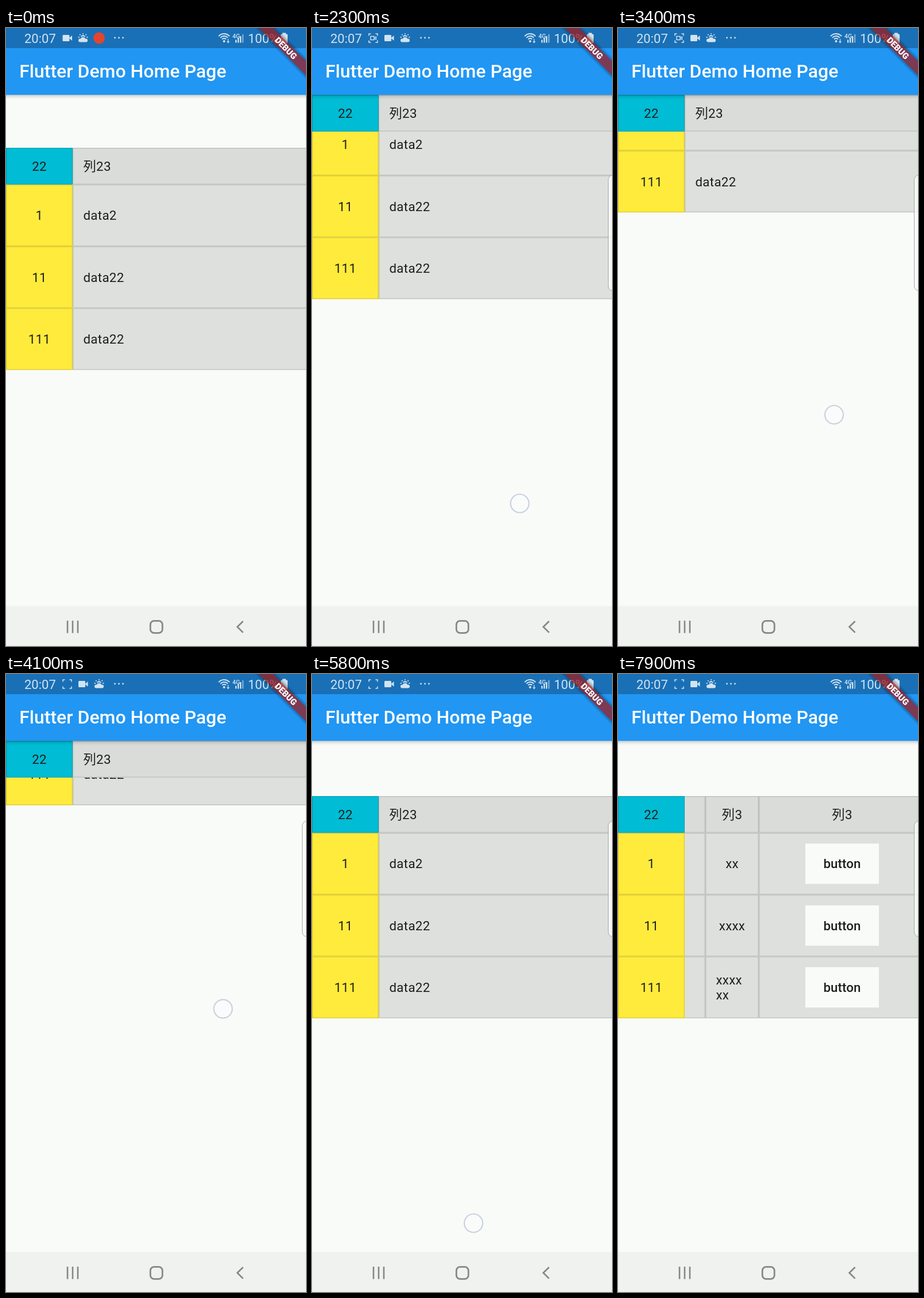
Animation, 522 px wide and 1073 px high, one loop 8000 ms. Source, as an HTML page with a canvas:

```html
<!DOCTYPE html>
<html lang="en">
<head>
<meta charset="utf-8">
<title>Table scroll</title>
<style>
html, body { margin: 0; width: 100%; height: 100%; overflow: hidden; background: #f9fbf8; }
canvas { display: block; }
</style>
</head>
<body>
<canvas id="stage" width="522" height="1073"></canvas>
<script>
const ctx = document.getElementById('stage').getContext('2d');
const W = 522, H = 1073, LOOP = 8000, STEP = 100;
const FONT = 'Roboto, "Noto Sans CJK JP", "Noto Sans CJK SC", "Noto Sans CJK", sans-serif';
const PAPER = '#f9fbf8', INK = '#1d1e1d', STATUS_INK = '#d3e3f0';
const BAR_BOTTOM = 116, HEAD_H = 63.8, ROW_H = 107.3, FIXED_W = 116;

// time, finger x, finger y, table top
const VERTICAL = [
  [1200, 357, 946, 208], [1500, 358, 888, 148], [2000, 359, 851, 110],
  [2300, 361.5, 825.5, 85], [2900, 369, 744, 8], [3400, 376, 671.5, -65.5],
  [3800, 379, 617, -121], [4200, 376, 577, -163], [4700, 360, 612, -136],
  [5000, 346.5, 657.5, -92], [5300, 321, 795, 40], [5600, 290, 928, 182],
  [5800, 281, 953.5, 212], [6100, 279, 953, 212]
];
// time, finger x, finger y, horizontal offset
const HORIZONTAL = [
  [6300, 440, 432, 0], [6600, 405, 431, 22], [7000, 190, 428, 250],
  [7200, 95, 427, 347], [7300, 63, 427, 374], [7500, 63, 427, 392],
  [7900, 63, 427, 399]
];

const COLUMNS = [
  { width: 435, head: '列23', cells: ['data2', 'data22', 'data22'], left: true },
  { width: 93, head: '列3', cells: ['xx', 'xxxx', 'xxxx\nxx'] },
  { width: 290, head: '列3', cells: ['button', 'button', 'button'], button: true }
];
const FIXED = { width: FIXED_W, head: '22', cells: ['1', '11', '111'], fixed: true };

function sample(keys, t, field) {
  const last = keys.length - 1;
  if (t <= keys[0][0]) return keys[0][field];
  if (t >= keys[last][0]) return keys[last][field];
  const i = keys.findIndex(k => k[0] > t) - 1;
  const slope = j => {
    const a = keys[Math.max(0, j - 1)], b = keys[Math.min(last, j + 1)];
    return (b[field] - a[field]) / (b[0] - a[0]);
  };
  const a = keys[i], b = keys[i + 1], d = b[0] - a[0], u = (t - a[0]) / d;
  const u2 = u * u, u3 = u2 * u;
  return (2 * u3 - 3 * u2 + 1) * a[field] + (u3 - 2 * u2 + u) * d * slope(i)
    + (3 * u2 - 2 * u3) * b[field] + (u3 - u2) * d * slope(i + 1);
}

function rect(x, y, w, h, color) {
  ctx.fillStyle = color;
  ctx.fillRect(x, y, w, h);
}

function disc(x, y, r, color) {
  ctx.fillStyle = color;
  ctx.beginPath();
  ctx.arc(x, y, r, 0, Math.PI * 2);
  ctx.fill();
}

function line(points, color, width) {
  ctx.strokeStyle = color;
  ctx.lineWidth = width;
  ctx.beginPath();
  points.forEach(([x, y]) => ctx.lineTo(x, y));
  ctx.stroke();
}

function text(str, x, y, { size = 22.3, weight = 400, color = INK, align = 'left', spacing = 0.3 } = {}) {
  ctx.font = `${weight} ${size}px ${FONT}`;
  ctx.letterSpacing = spacing + 'px';
  ctx.textAlign = align;
  ctx.fillStyle = color;
  ctx.fillText(str, x, y);
}

function clipped(x, y, w, h, draw) {
  ctx.save();
  ctx.beginPath();
  ctx.rect(x, y, w, h);
  ctx.clip();
  draw();
  ctx.restore();
}

function cell(x, y, w, h, color) {
  rect(x, y, w, h, color);
  ctx.strokeStyle = 'rgba(0,0,0,0.13)';
  ctx.lineWidth = 1.45;
  ctx.strokeRect(x + 0.72, y + 0.72, w - 1.45, h - 1.45);
}

function label(col, str, x, mid) {
  if (col.left) return text(str, x + 18.5, mid + 8);
  const lines = str.split('\n');
  if (lines.length > 1) {
    lines.forEach((s, i) => text(s, x + 18.5, mid - 5 + i * 26));
  } else {
    text(str, x + col.width / 2, mid + 8, { align: 'center' });
  }
}

function drawRows(col, x, top) {
  col.cells.forEach((str, i) => {
    const y = top + HEAD_H + i * ROW_H, mid = y + ROW_H / 2;
    cell(x, y, col.width, ROW_H, col.fixed ? '#ffeb3b' : '#dee0dd');
    if (col.button) {
      const cx = x + col.width / 2;
      rect(cx - 64, mid - 35, 128, 70, PAPER);
      text(str, cx, mid + 8, { weight: 500, align: 'center', spacing: 0.1 });
    } else {
      label(col, str, x, mid);
    }
  });
}

function drawHead(col, x, y) {
  cell(x, y, col.width, HEAD_H, col.fixed ? '#00bcd4' : '#dadcd9');
  label(col, col.head, x, y + HEAD_H / 2);
}

function drawTable(top, shift) {
  const headY = Math.max(BAR_BOTTOM, top), bodyY = headY + HEAD_H;
  const eachColumn = draw => {
    clipped(FIXED_W, 0, W - FIXED_W, H, () => {
      let x = FIXED_W - shift;
      for (const col of COLUMNS) {
        draw(col, x);
        x += col.width;
      }
    });
    draw(FIXED, 0);
  };
  clipped(0, bodyY, W, H, () => eachColumn((col, x) => drawRows(col, x, top)));
  eachColumn((col, x) => drawHead(col, x, headY));
}

function drawAppBar() {
  const shade = ctx.createLinearGradient(0, BAR_BOTTOM, 0, BAR_BOTTOM + 8);
  shade.addColorStop(0, 'rgba(0,0,0,0.22)');
  shade.addColorStop(0.4, 'rgba(0,0,0,0.08)');
  shade.addColorStop(1, 'rgba(0,0,0,0)');
  rect(0, BAR_BOTTOM, W, 8, shade);
  rect(0, 0, W, BAR_BOTTOM, '#2196f3');
  rect(0, 0, W, 35, '#1a70b6');
  text('Flutter Demo Home Page', 23.2, 86, { size: 31.9, weight: 500, color: '#fff', spacing: 0.05 });
}

function cameraIcon(x) {
  ctx.fillStyle = STATUS_INK;
  ctx.beginPath();
  ctx.roundRect(x - 8.5, 12, 12, 11, 1.5);
  ctx.moveTo(x + 3, 17.5);
  ctx.lineTo(x + 8, 13);
  ctx.lineTo(x + 8, 22);
  ctx.fill();
}

function weatherIcon(x) {
  for (let i = 0; i < 5; i++) {
    const a = Math.PI * (1 + i / 4), c = Math.cos(a), s = Math.sin(a);
    line([[x + 6 * c, 16 + 5 * s], [x + 8.5 * c, 16 + 7 * s]], STATUS_INK, 1.6);
  }
  disc(x, 16, 3.8, STATUS_INK);
  disc(x, 19.5, 5, '#1a70b6');
  disc(x, 20, 4, STATUS_INK);
  ctx.beginPath();
  ctx.roundRect(x - 8, 18.5, 16, 6, 3);
  ctx.fill();
}

function recorderIcon(x, lit) {
  for (const sx of [-1, 1]) for (const sy of [-1, 1]) {
    line([[x + sx * 4, 17.5 + sy * 7.5], [x + sx * 7.5, 17.5 + sy * 7.5], [x + sx * 7.5, 17.5 + sy * 4]], STATUS_INK, 1.5);
  }
  if (!lit) return;
  ctx.lineWidth = 1.4;
  ctx.strokeRect(x - 4.5, 14.5, 6, 6);
  line([[x + 2, 17], [x + 5, 15], [x + 5, 20], [x + 2, 18]], STATUS_INK, 1.2);
}

function drawStatus(t) {
  text('20:07', 32, 26, { size: 22, color: STATUS_INK, spacing: 0 });
  if (t < 100) {
    cameraIcon(107);
    weatherIcon(134);
    disc(162, 17.5, 10, '#e2452f');
  } else {
    recorderIcon(106.5, (t + 800) % 1000 < 500);
    cameraIcon(134.5);
    weatherIcon(162);
  }
  for (let i = 0; i < 3; i++) disc(189.5 + i * 7, 17, 1.4, STATUS_INK);

  ctx.strokeStyle = STATUS_INK;
  ctx.lineWidth = 2;
  for (const r of [4.5, 8.5, 12.5]) {
    ctx.beginPath();
    ctx.arc(379.5, 22.5, r, Math.PI * 1.23, Math.PI * 1.77);
    ctx.stroke();
  }
  disc(379.5, 23, 2, STATUS_INK);
  line([[386.5, 19], [386.5, 25]], STATUS_INK, 1.3);
  line([[384.5, 23], [386.5, 25.5], [388.5, 23]], STATUS_INK, 1.2);
  text('4G', 394, 17.5, { size: 10.5, weight: 500, color: STATUS_INK, spacing: 0 });
  for (let i = 0; i < 4; i++) {
    const h = 5 + i * 3.2;
    rect(399 + i * 4, 25.5 - h, 2.3, h, i < 3 ? STATUS_INK : '#7fadd2');
  }
  text('100%', 421, 26, { size: 22, color: STATUS_INK, spacing: 0 });
  rect(481, 8.5, 6, 3, STATUS_INK);
  ctx.beginPath();
  ctx.roundRect(478, 10.5, 12, 16.5, 1.5);
  ctx.fill();
}

function drawBanner() {
  ctx.save();
  ctx.translate(W, 0);
  ctx.rotate(Math.PI / 4);
  // Shadow only outside the strip, so the translucent red stays clean.
  for (let i = 1; i <= 5; i++) rect(-70, 40.6 - i, 140, 17.4 + 2 * i, 'rgba(0,0,0,0.055)');
  rect(-58, 40.6, 116, 17.4, 'rgba(183,28,28,0.63)');
  text('DEBUG', 0, 54.6, { size: 14.8, weight: 900, color: '#fff', align: 'center', spacing: 0 });
  ctx.restore();
}

function drawNav() {
  const gray = '#858785';
  rect(0, 1003.5, W, H - 1003.5, '#f0f2ef');
  for (let i = -1; i <= 1; i++) rect(114.7 + i * 9, 1029, 2.6, 21.5, gray);
  ctx.strokeStyle = gray;
  ctx.lineWidth = 2.8;
  ctx.beginPath();
  ctx.roundRect(251.2, 1029.4, 21, 21, 6.5);
  ctx.stroke();
  line([[412.5, 1030], [402.5, 1039.8], [412.5, 1049.6]], gray, 2.7);
}

function drawEdgeHandle(t) {
  const shown = Math.min(1, Math.max(0, (t - 200) / 500));
  if (!shown) return;
  ctx.beginPath();
  ctx.roundRect(W - 6.5 * shown, 255.5, 30, 200.5, 8);
  ctx.fillStyle = 'rgba(252,253,251,0.8)';
  ctx.fill();
  ctx.strokeStyle = '#a5a7a5';
  ctx.lineWidth = 1;
  ctx.stroke();
}

function drawFinger(keys, t) {
  const x = sample(keys, t, 1), y = sample(keys, t, 2);
  disc(x, y, 16, 'rgba(251,253,252,0.85)');
  ctx.strokeStyle = '#c9d2e1';
  ctx.lineWidth = 2.2;
  ctx.stroke();
}

function render(t) {
  rect(0, 0, W, H, PAPER);
  drawTable(sample(VERTICAL, t, 3), sample(HORIZONTAL, t, 3));
  drawAppBar();
  drawStatus(t);
  drawBanner();
  drawNav();
  drawEdgeHandle(t);
  if (t >= 1200 && t <= 6000) drawFinger(VERTICAL, t);
  if (t >= 6300 && t <= 7300) drawFinger(HORIZONTAL, t);
}

const start = performance.now();
function tick() {
  const elapsed = (performance.now() - start) % LOOP;
  render(Math.floor(elapsed / STEP) * STEP);
  requestAnimationFrame(tick);
}
tick();
</script>
</body>
</html>
```
